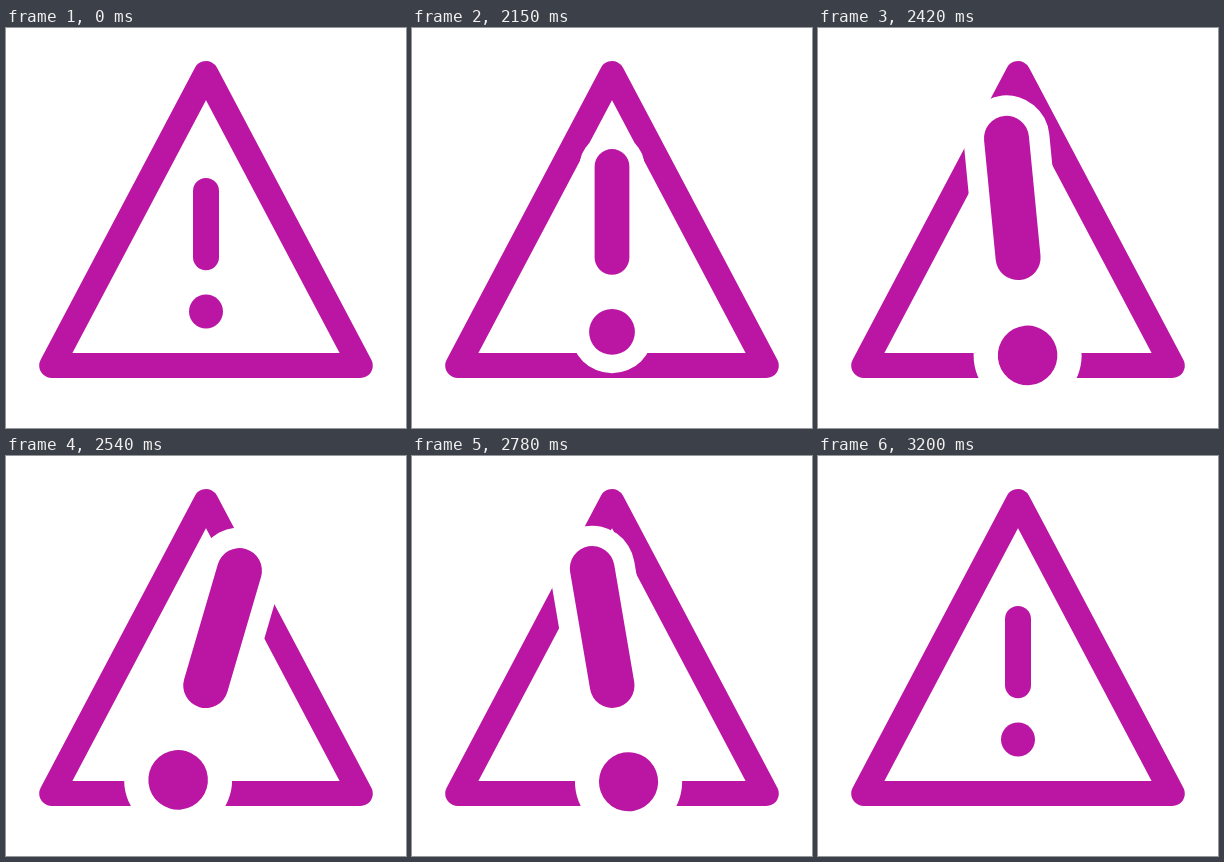
An HTML page with a canvas that plays this animation: 400 by 400 pixels, repeating every 3230 ms.

```html
<!DOCTYPE html>
<html lang="en">
<head>
<meta charset="utf-8">
<title>Warning sign</title>
<style>
  html, body { margin: 0; width: 100%; height: 100%; overflow: hidden; background: #fff; }
  canvas { display: block; width: 400px; height: 400px; }
</style>
</head>
<body>
<canvas id="stage" width="400" height="400"></canvas>
<script>
const ctx = document.getElementById('stage').getContext('2d');
const COLOR = '#ba16a3';
const LOOP = 3230, MOVE_START = 2030, STEP = 30;
const PIVOT = { x: 200, y: 228.7 };

// [time in ms, value], eased between neighbours
const GROWTH = [[2015, 0], [2300, 1], [2745, 1], [3200, 0]];
const TILT = [[2240, 0], [2360, -30], [2497, 30], [2636, -30], [2868, 0]];

const mix = (a, b, x) => a + (b - a) * x;
const ease = x => x * x * (3 - 2 * x);

function valueAt(keys, t) {
  if (t <= keys[0][0]) return keys[0][1];
  for (let i = 1; i < keys.length; i++) {
    const [t0, v0] = keys[i - 1], [t1, v1] = keys[i];
    if (t < t1) return mix(v0, v1, ease((t - t0) / (t1 - t0)));
  }
  return keys[keys.length - 1][1];
}

function triangle() {
  ctx.strokeStyle = COLOR;
  ctx.lineWidth = 25;
  ctx.lineJoin = 'round';
  ctx.beginPath();
  ctx.moveTo(200, 45.5);
  ctx.lineTo(354.3, 337.5);
  ctx.lineTo(45.7, 337.5);
  ctx.closePath();
  ctx.stroke();
}

// Exclamation mark relative to the pivot
function mark(color, spread, barRadius, dotRadius) {
  ctx.strokeStyle = ctx.fillStyle = color;
  ctx.lineWidth = barRadius * 2;
  ctx.lineCap = 'round';
  ctx.beginPath();
  ctx.moveTo(0, -65.7 * spread);
  ctx.lineTo(0, 0.5 * spread);
  ctx.stroke();
  ctx.beginPath();
  ctx.arc(0, 54.8 * spread, dotRadius, 0, Math.PI * 2);
  ctx.fill();
}

function draw(t) {
  const k = valueAt(GROWTH, t);
  const spread = 1 + 0.81 * k;
  ctx.fillStyle = '#fff';
  ctx.fillRect(0, 0, 400, 400);
  triangle();
  ctx.save();
  ctx.translate(PIVOT.x, PIVOT.y);
  ctx.rotate(valueAt(TILT, t) * Math.PI / 180);
  mark('#fff', spread, mix(23.6, 43, k), mix(30.4, 54, k));
  mark(COLOR, spread, mix(13, 22.5, k), mix(17, 29.8, k));
  ctx.restore();
}

const start = performance.now();
function tick() {
  const t = (performance.now() - start) % LOOP;
  const stepped = MOVE_START + Math.floor((t - MOVE_START) / STEP) * STEP;
  draw(t < MOVE_START ? 0 : stepped);
  requestAnimationFrame(tick);
}
tick();
</script>
</body>
</html>
```
